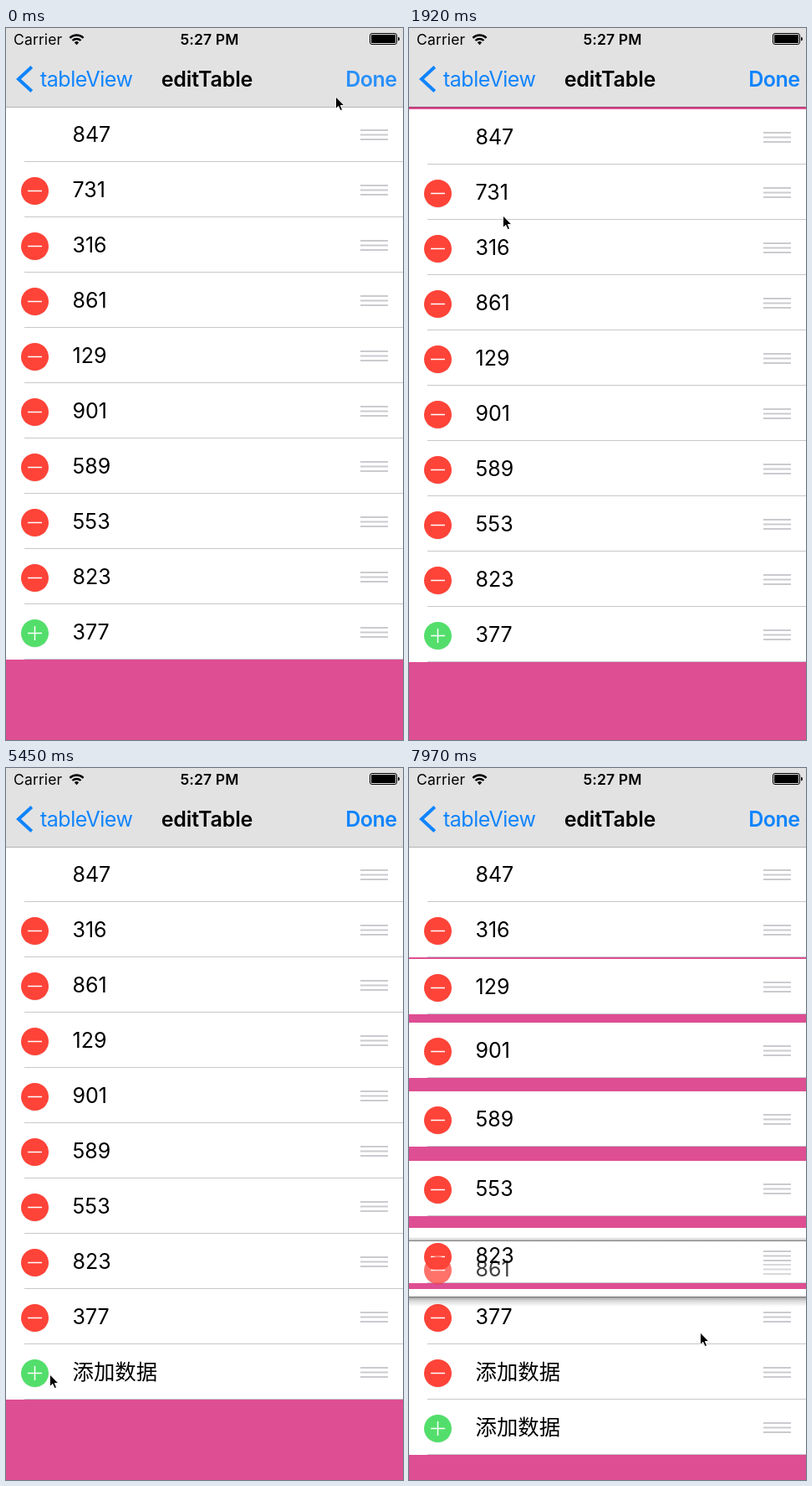
These frames come from a looping animation (475x850 px, 8000 ms). An HTML page:

```html
<!DOCTYPE html>
<html lang="zh-CN">
<head>
<meta charset="utf-8">
<title>editTable</title>
<style>
  html, body { margin: 0; width: 100%; height: 100%; overflow: hidden; background: #de4e92; }
  svg { display: block; width: 475px; height: 850px; }
  text { font: 25px Inter, "Noto Sans CJK SC", "Noto Sans CJK", sans-serif; }
  .bar text { letter-spacing: -.5px; }
  .bar .status { font-size: 17.5px; letter-spacing: .15px; }
  .bar .title { letter-spacing: -.15px; }
  .bold { font-weight: 600; }
  .blue { fill: #0f84fd; }
  .mid { text-anchor: middle; }
  .end { text-anchor: end; }
  .han { font-size: 25.4px; }
</style>
</head>
<body>
<svg viewBox="0 0 475 850">
  <defs>
    <linearGradient id="above" x2="0" y2="1">
      <stop offset="0" stop-opacity="0"/><stop offset="1" stop-opacity=".3"/>
    </linearGradient>
    <linearGradient id="below" x2="0" y2="1">
      <stop offset="0" stop-opacity=".42"/><stop offset=".4" stop-opacity=".16"/><stop offset="1" stop-opacity="0"/>
    </linearGradient>
    <g id="disc">
      <circle cx="34.5" cy="35.5" r="16.5" fill="#000" opacity=".06"/>
      <circle cx="34.5" cy="34.5" r="16.5"/>
      <path d="M26 34.5h17" stroke="#fff" stroke-width="1.5"/>
    </g>
    <g id="minus" fill="#fe4338"><use href="#disc"/></g>
    <g id="plus" fill="#53de6b">
      <use href="#disc"/><path d="M34.5 26v17" stroke="#fff" stroke-width="1.5"/>
    </g>
  </defs>

  <rect width="475" height="850" fill="#de4e92"/>
  <g id="list"></g>

  <g class="bar">
    <rect width="475" height="94" fill="#e2e2e2"/>
    <rect y="94" width="475" height="1" opacity=".3"/>
    <text class="status" x="9" y="20">Carrier</text>
    <path d="M76.4 11.9a11.5 11.5 0 0 1 16.2 0M79.5 15a7.1 7.1 0 0 1 10 0" fill="none" stroke="#000" stroke-width="2.4"/>
    <path d="M84.5 20.2l-2.7-2.9a3.8 3.8 0 0 1 5.4 0z"/>
    <text class="status bold mid" x="243.5" y="20">5:27 PM</text>
    <rect x="435.5" y="6.5" width="32" height="13" rx="2.5" fill="none" stroke="#000"/>
    <rect x="437" y="8" width="29" height="10" rx="1"/>
    <path d="M469 10.5q2 .5 2 2.5t-2 2.5z"/>
    <path d="M30.8 46.6L15 61l15.8 14.4" fill="none" stroke="#0f84fd" stroke-width="4"/>
    <text class="blue" x="41" y="70">tableView</text>
    <text class="title bold mid" x="240.5" y="70">editTable</text>
    <text class="blue bold end" id="done" x="467.5" y="70">Done</text>
  </g>

  <path id="cursor" d="M0 0V14.5L3.3 11.4 5.6 16.6 8 15.6 5.8 10.5H10.3Z" stroke="#fff" stroke-width=".9"/>
</svg>

<script>
const LOOP = 8000, TICK = 147.2;   // the picture refreshes once per tick
const TOP = 94, ROW = 66;
const DELETED = 1, LIFTED = 3, ADDED = 10;
const ADD_AT = [4125, 5455];
const DRAG_AT = 7679, PACE = 52.5; // ms the dragged row needs to pass one row

const $ = id => document.getElementById(id);
const clamp = p => Math.min(1, Math.max(0, p));
const ease = (t, start, span) => {
  const p = clamp((t - start) / span);
  return p * p * (3 - 2 * p);
};
const move = (el, x, y) => el.setAttribute('transform', `translate(${x} ${y})`);
const fade = (el, v) => el.setAttribute('opacity', v);

// Cursor legs: start, end, target x, target y
const legs = [
  [300, 750, 416, 141],
  [884, 1030, 416, 195],    // pull the list down
  [1030, 1400, 312, 270],
  [1400, 1914, 112.5, 224],
  [1914, 2200, 42, 200],    // minus
  [2500, 3240, 425, 200],   // Delete
  [3390, 3827, 49, 611],
  [3827, 4270, 42, 656],    // plus
  [4710, 5446, 52.5, 724],  // plus again
  [5446, 5750, 40, 722],
  [5800, 6330, 232, 422],
  [6480, 6770, 449, 270],   // grab a row
  [DRAG_AT, 7949, 348.5, 674]
];
const cursorAt = t => legs.reduce(([x, y], [from, to, tx, ty]) => {
  const k = ease(t, from, to - from);
  return [x + (tx - x) * k, y + (ty - y) * k];
}, [394.5, 82]);

// Pulled down 56px, then released to spring back
const pull = t => Math.floor(56 * Math.min(ease(t, 872, 430), Math.exp((1390 - t) / 181)));
const drag = t => Math.max(0, ROW * (t - DRAG_AT) / PACE);

const labels = '847 731 316 861 129 901 589 553 823 377 添加数据 添加数据'.split(' ');

const rows = labels.map((label, i) => {
  const g = document.createElementNS('http://www.w3.org/2000/svg', 'g');
  const grip = [0, 1, 2].map(n => `<rect x="424" y="${27 + 5.5 * n}" width="33" height="2"/>`).join('');
  g.innerHTML = `
    <g class="shadow" opacity="0">
      <rect y="-5" width="475" height="5" fill="url(#above)"/>
      <rect y="-1" width="475" height="1" opacity=".32"/>
      <rect y="66" width="475" height="12" fill="url(#below)"/>
      <rect y="66" width="475" height="1" opacity=".25"/>
    </g>
    <rect class="back" width="475" height="66" fill="#fff"/>
    ${i === DELETED ? `<rect x="475" width="122" height="65" fill="#fe3b30"/>
      <text class="mid" x="536" y="41.5" fill="#fff">Delete</text>` : ''}
    <g class="body">
      ${i ? '<use href="#minus"/>' : ''}
      <text class="${i >= ADDED ? 'han' : ''}" x="79.5" y="41.5">${label}</text>
      <g fill="#cbcacf">${grip}</g>
    </g>
    <rect class="line" x="22" y="65" width="453" height="1" fill="#c8c7cc"/>`;
  const part = name => g.querySelector('.' + name);
  return { g, icon: g.querySelector('use'), shadow: part('shadow'), back: part('back'), body: part('body'), line: part('line') };
});

// New rows and the removed one lie beneath the others, the lifted one on top
const depth = i => i >= ADDED ? -i : i === DELETED ? -1 : i === LIFTED ? 1 : 0;
rows.map((r, i) => i).sort((a, b) => depth(a) - depth(b)).forEach(i => $('list').append(rows[i].g));

function draw(t) {
  const removed = ease(t, 3330, 400);
  const added = ADD_AT.map(start => ease(t, start, 290));
  const last = ADDED - 1 + added.filter(p => p > 0).length;
  const lift = ease(t, 7080, 280);

  rows.forEach((r, i) => {
    const x = i === DELETED ? -122 * ease(t, 2240, 330) : 0;
    let y = TOP + pull(t) + ROW * i;
    if (i > DELETED) y -= ROW * removed;
    if (i >= ADDED) y -= ROW * (1 - added[i - ADDED]);
    if (i === LIFTED) y += drag(t);
    if (i > LIFTED) y -= ROW * ease(t, DRAG_AT + PACE * (i - LIFTED - 1), 300);
    move(r.g, x, Math.round(y));
    const hidden = i > last || (i === DELETED && removed === 1);
    r.g.setAttribute('visibility', hidden ? 'hidden' : 'visible');
    if (r.icon) r.icon.setAttribute('href', i === last ? '#plus' : '#minus');
  });

  const up = rows[LIFTED];
  fade(up.shadow, lift);
  fade(up.back, 1 - lift);
  fade(up.line, 1 - lift);
  fade(up.body, 1 - .25 * lift);

  fade($('done'), .87 + .13 * clamp(t / 300));
  move($('cursor'), ...cursorAt(t));
  fade($('cursor'), t > 6400 && t < 6700 ? 0 : 1);
}

const start = performance.now();
let shown = -1;
function loop() {
  const tick = Math.floor((performance.now() - start) % LOOP / TICK);
  if (tick !== shown) draw((shown = tick) * TICK);
  requestAnimationFrame(loop);
}
loop();
</script>
</body>
</html>
```
